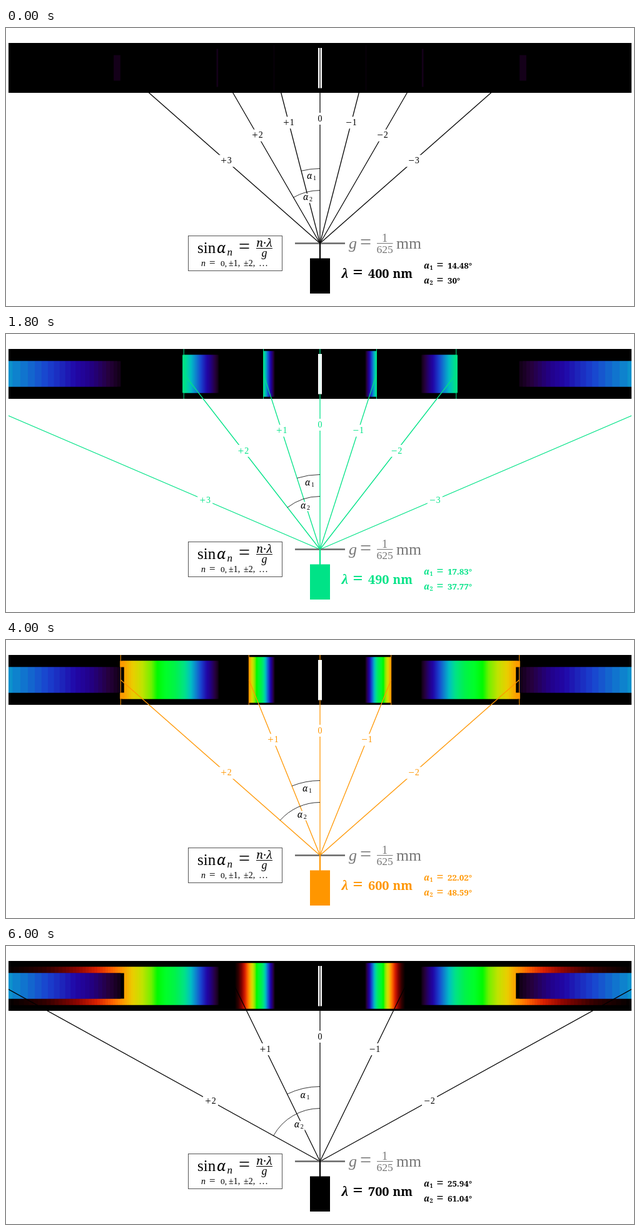
Recreate the animation shown at these times as an HTML page with a canvas. Size 1004 px wide and 446 px high, loop 8 s.

```html
<!DOCTYPE html>
<html lang="en">
<head>
<meta charset="utf-8">
<title>Diffraction grating</title>
<style>
  html, body { margin: 0; width: 100%; height: 100%; overflow: hidden; background: #fff; }
  canvas { display: block; }
</style>
</head>
<body>
<canvas id="stage" width="1004" height="446"></canvas>
<script>
const ctx = document.getElementById('stage').getContext('2d');
const SERIF = '"Liberation Serif", serif', WIDE = '"Noto Serif", serif';
const OX = 502, OY = 345.5, SCREEN_Y = 64, DIST = 281, GRATING = 1600;
const BAND = [0, 36.5, 30.5, 20.5]; // half heights of the spectra

// wavelength, red, green, blue
const SPECTRUM = [
  [400, 0, 0, 0], [403, 20, 0, 25], [412, 38, 0, 62], [425, 35, 0, 135],
  [435, 32, 8, 168], [450, 25, 67, 207], [465, 12, 140, 205], [475, 0, 190, 195],
  [490, 0, 227, 135], [510, 0, 242, 75], [530, 0, 255, 40], [545, 0, 250, 0],
  [555, 110, 240, 0], [570, 191, 227, 0], [585, 235, 205, 0], [600, 255, 150, 0],
  [612, 255, 100, 0], [630, 218, 32, 0], [650, 140, 5, 0], [675, 50, 0, 0], [700, 0, 0, 0]
];

function rgb(nm) {
  const i = Math.max(1, SPECTRUM.findIndex(s => s[0] >= nm));
  const a = SPECTRUM[i - 1], b = SPECTRUM[i];
  const f = (nm - a[0]) / (b[0] - a[0]);
  return [1, 2, 3].map(j => Math.round(a[j] + (b[j] - a[j]) * f));
}
const css = c => `rgb(${c.join()})`;
const angle = (n, nm) => Math.asin(n * nm / GRATING);
const offset = (n, nm) => DIST * Math.tan(angle(n, nm));

function text(s, x, y, size, style = '', family = SERIF, align = 'left') {
  ctx.font = `${style} ${size}px ${family}`;
  ctx.textAlign = align;
  ctx.fillText(s, x, y);
}

function line(x1, y1, x2, y2, width) {
  ctx.lineWidth = width;
  ctx.beginPath();
  ctx.moveTo(x1, y1);
  ctx.lineTo(x2, y2);
  ctx.stroke();
}

function blank(x, y, w, h) {
  ctx.fillStyle = '#fff';
  ctx.fillRect(x - w, y - h, 2 * w, 2 * h);
}

function spectra(nm) {
  ctx.fillStyle = '#000';
  ctx.fillRect(4, 24, 996, 80);
  const last = Math.max(403, nm);
  for (let n = 1; n <= 3; n++) {
    for (let c = 400; c <= last && n * (c + 3) < GRATING; c += 3) {
      const a = offset(n, c - 3), b = offset(n, c + 3);
      ctx.fillStyle = css(rgb(c));
      for (const x of [OX - b, OX + a])
        ctx.fillRect(x, SCREEN_Y - BAND[n], b - a, 2 * BAND[n]);
    }
  }
  ctx.fillStyle = '#fff';
  ctx.fillRect(499, 32, 6, 64.5);
}

function rays(nm, color) {
  ctx.strokeStyle = css(color);
  const shown = [];
  for (let n = -3; n <= 3; n++) if (Math.abs(n) * nm < 0.98 * GRATING) shown.push(n);
  for (const n of shown) {
    const x = OX - offset(n, nm);
    if (n) {
      line(x, 24, x, 104, 1);
      line(OX, OY, x, SCREEN_Y, 1.25);
    } else {
      line(x, 24, x, 32, 1.25);
      line(x, 96.5, x, OY, 1.25);
      ctx.globalAlpha = 1 - 0.85 * Math.max(...color) / 255;
      line(x, 32, x, 96.5, 1.25);
      ctx.globalAlpha = 1;
    }
  }
  for (const n of shown) {
    const a = angle(n, nm), x = OX - 200 * Math.sin(a), y = OY - 200 * Math.cos(a);
    blank(x, y, n ? 12 : 8, 9.5);
    ctx.fillStyle = css(color);
    if (n) text(n > 0 ? '+' : '−', x - 4, y + 5.2, 17, '', SERIF, 'center');
    text(Math.abs(n), x + (n ? 5.2 : 0), y + 4.2, 14, '', SERIF, 'center');
  }
}

function arc(n, nm, radius, labelRadius) {
  const a = angle(n, nm);
  const x = OX - labelRadius * Math.sin(a / 2), y = OY - labelRadius * Math.cos(a / 2);
  blank(x, y, 9.5, 7.5);
  ctx.strokeStyle = ctx.fillStyle = '#000';
  ctx.lineWidth = 0.8;
  ctx.beginPath();
  ctx.arc(OX, OY, radius, -Math.PI / 2 - a, -Math.PI / 2);
  ctx.stroke();
  text('α', x - 7.5, y + 3, 14, 'italic', WIDE);
  text(n, x + 2.5, y + 5, 10);
}

function formulas() {
  ctx.strokeStyle = '#444';
  ctx.lineWidth = 0.9;
  ctx.strokeRect(291.5, 333.5, 150, 56);
  ctx.fillStyle = ctx.strokeStyle = '#000';
  text('sin', 306, 361, 25);
  text('α', 337, 361, 24, 'italic', WIDE);
  text('n', 353.5, 364.5, 17, 'italic');
  text('=', 372, 361, 32);
  text('n·λ', 413, 351, 18, 'italic', WIDE, 'center');
  line(400, 353.5, 426, 353.5, 1);
  text('g', 413, 367, 18, 'italic', SERIF, 'center');
  text('n', 312, 382, 14, 'italic');
  text('=', 325, 382, 17);
  text('0,', 343, 382, 13.5);
  text('±1,', 356, 382, 14);
  text('±2,', 380, 382, 14);
  text('…', 404, 382, 15);

  ctx.fillStyle = ctx.strokeStyle = '#777';
  text('g', 548, 354, 26, 'italic');
  text('=', 566, 354, 32);
  text('1', 605.5, 342.5, 18, '', SERIF, 'center');
  line(593, 345.5, 618.5, 345.5, 1);
  text('625', 605.5, 360.5, 17.5, '', SERIF, 'center');
  text('mm', 624, 354, 25.7);
}

function source(nm, color) {
  ctx.strokeStyle = '#666';
  line(462, 345.5, 542, 345.5, 2.4);
  ctx.fillStyle = ctx.strokeStyle = css(color);
  line(OX, 344, OX, 371, 2.2);
  ctx.fillRect(486, 369.5, 32, 56.5);
  text('λ', 536, 401, 20, 'italic bold', WIDE);
  text('=', 554.5, 401, 28, 'bold');
  text(nm, 579, 401, 20, 'bold', WIDE);
  text('nm', 618.5, 401, 19, 'bold', WIDE);
  for (const n of [1, 2]) {
    const y = 361.5 + 24 * n;
    const degrees = +(angle(n, nm) * 180 / Math.PI).toFixed(2);
    text('α', 668, y, 13.5, 'italic bold', WIDE);
    text(n, 677.5, y + 2, 9, 'bold', WIDE);
    text('=', 688.5, y, 19, 'bold');
    text(degrees + '°', 706, y, 13.3, 'bold', WIDE);
  }
}

function draw(now) {
  const nm = 400 + 10 * Math.min(30, Math.floor(now % 8000 / 200));
  const color = rgb(nm);
  ctx.fillStyle = '#fff';
  ctx.fillRect(0, 0, 1004, 446);
  ctx.save();
  ctx.beginPath();
  ctx.rect(4, 0, 996, 446);
  ctx.clip();
  spectra(nm);
  rays(nm, color);
  ctx.restore();
  arc(1, nm, 120, 107);
  arc(2, nm, 85, 83 - 15.5 * angle(2, nm));
  formulas();
  source(nm, color);
  requestAnimationFrame(draw);
}
requestAnimationFrame(draw);
</script>
</body>
</html>
```
